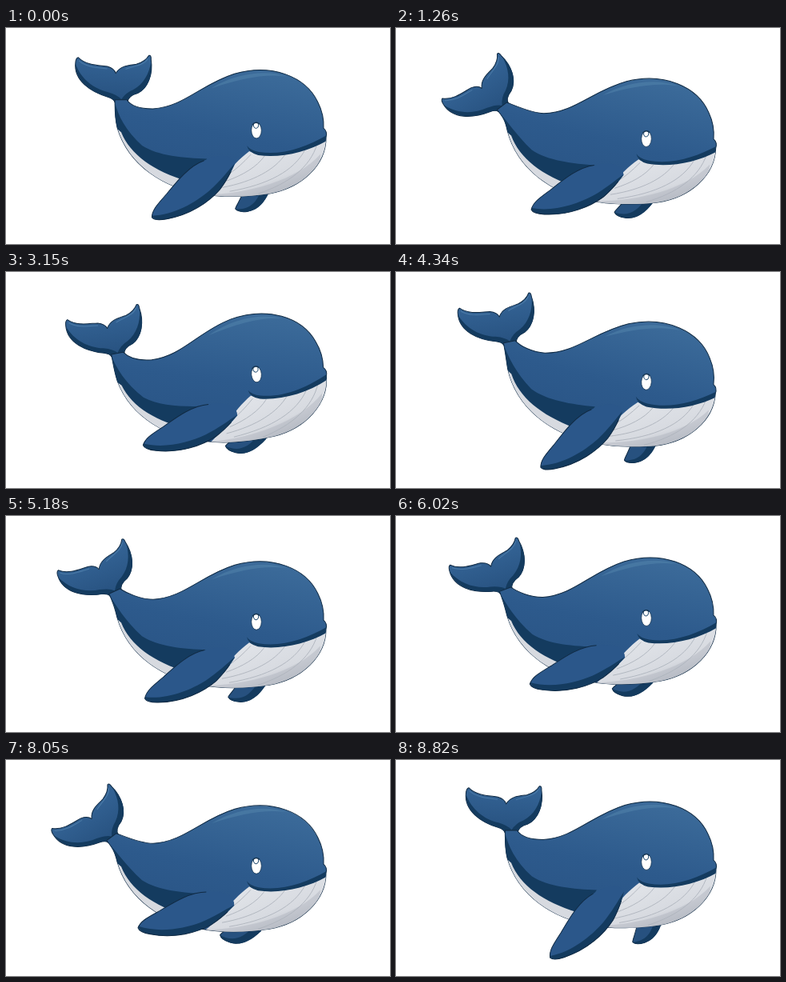
An HTML page for the animation above (8890 ms loop, 480 by 270 pixels).

```html
<!DOCTYPE html>
<html lang="en">
<head>
<meta charset="utf-8">
<title>Swimming whale</title>
<style>
  html, body { margin: 0; width: 100%; height: 100%; overflow: hidden; background: #fff; }
  svg { display: block; width: 100vw; height: 100vh; }
  .edge { stroke: #102a43; stroke-width: 1; stroke-linejoin: round; }
  .navy { fill: #143b5f; }
  .groove { fill: none; stroke: #aeb4bd; stroke-width: .9; }
</style>
</head>
<body>
<svg viewBox="0 0 480 270">
  <defs>
    <linearGradient id="skin" gradientUnits="userSpaceOnUse" x1="290" y1="50" x2="255" y2="215">
      <stop offset="0" stop-color="#3b6a99"/>
      <stop offset=".5" stop-color="#2d5a8c"/>
      <stop offset="1" stop-color="#295384"/>
    </linearGradient>
    <linearGradient id="fluke" x1="0" y1="0" x2="0" y2="1">
      <stop offset="0" stop-color="#356597"/>
      <stop offset="1" stop-color="#27517f"/>
    </linearGradient>
    <linearGradient id="throat" gradientUnits="userSpaceOnUse" x1="325" y1="150" x2="345" y2="208">
      <stop offset="0" stop-color="#e0e3e8"/>
      <stop offset=".65" stop-color="#d7dae0"/>
      <stop offset="1" stop-color="#b7bcc4"/>
    </linearGradient>
    <clipPath id="bodyClip"><path id="clipShape"/></clipPath>
  </defs>
  <g id="whale">
    <g id="farFin">
      <path class="edge" fill="#27517f" d="M336 178C333 208 323 225 309 229Q298 232 294 228C294 222 303 212 303 180Z"/>
      <path class="navy" d="M334 195C329 218 320 226 309 229Q299 232 294 228C310 227 320 218 323 195Z"/>
    </g>
    <g id="tail">
      <path class="edge" fill="url(#fluke)" d="M135 92Q134 88 126 86C104 81 82 68 83 46Q83 40 86 39C97 49 114 47 123 48Q132 50 134 56C139 46 149 45 159 43Q170 39 174 31Q177 30 177 36C181 54 175 72 163 79Q151 83 151 91Z"/>
      <path class="navy" d="M135 91Q132 87 126 86C104 81 84 68 83 47C91 66 108 77 126 80Q139 83 143 88Q148 79 157 75C170 67 176 53 177 39C181 56 175 73 163 79Q151 83 150 91Z"/>
      <path fill="none" stroke="#4a7aa7" d="M87 43C99 52 116 50 123 51M146 50C156 45 169 44 173 35"/>
    </g>
    <path id="body" class="edge" fill="url(#skin)"/>
    <g clip-path="url(#bodyClip)">
      <path id="shade" class="navy"/>
      <path fill="#d7dae0" d="M144 129C155 157 184 178 227 191L228 210C185 200 150 170 138 124Z"/>
      <path fill="url(#throat)" d="M304 154C326 164 367 160 403 139L404 160C391 205 325 220 244 212C265 199 277 174 304 154Z"/>
      <path fill="#b3b8c1" opacity=".5" d="M248 208C302 207 363 191 393 158L390 190L330 214L244 216Z"/>
      <path class="groove" d="M323 160C313 174 295 184 275 191M349 158C336 177 309 192 270 199M374 152C360 179 327 196 279 204M389 145C380 175 352 195 315 207M306 158Q291 174 280 181"/>
      <path class="navy" d="M301 147Q305 153 316 155C345 160 376 149 402 134L402 141C376 156 343 163 315 159Q303 156 301 147Z"/>
      <path fill="#5585ae" opacity=".5" d="M257 75C288 56 326 52 351 61C324 57 294 63 257 75Z"/>
    </g>
    <g>
      <ellipse cx="313" cy="128" rx="6.3" ry="10" fill="#fff" stroke="#173653" stroke-width=".8"/>
      <path d="M309.5 119V123Q312.5 128 315.5 123V119" fill="#fff" stroke="#315779"/>
      <path d="M308 121Q312 116 317 120" fill="none" stroke="#173653" stroke-width="1.4"/>
    </g>
    <g id="nearFin">
      <path fill="#2b578a" d="M248 164C228 169 211 187 197 201C184 213 177 219 176 228Q179 233 193 232C224 230 249 216 264 202C274 191 280 182 286 172Q282 153 248 164Z"/>
      <path class="navy" d="M176 226C204 228 232 215 251 202C266 191 275 181 286 171C280 182 274 191 264 202C249 216 224 230 193 232Q178 233 176 226Z"/>
      <path fill="none" class="edge" d="M248 164C228 169 211 187 197 201C184 213 177 219 176 228Q179 233 193 232C224 230 249 216 264 202Q274 191 280 181"/>
    </g>
  </g>
</svg>
<script>
const LOOP = 8890, STEP = 70;
const TAIL_BEATS = [1150, 3810, 5570, 7870];
const FIN_BEATS = [-400, 1840, 4640, 6790, 9040];
const BEAT_REACH = 900;
const $ = id => document.getElementById(id);

// Rises smoothly from 0 to 1 at each beat and falls back again.
function pulse(beats, time) {
  return beats.reduce((sum, beat) => {
    const x = Math.min(Math.abs(time - beat) / BEAT_REACH, 1);
    return sum + Math.cos(x * Math.PI / 2) ** 2;
  }, 0);
}

function turnPoint(x, y, degrees, cx, cy) {
  const a = degrees * Math.PI / 180, c = Math.cos(a), s = Math.sin(a);
  return [cx + (x - cx) * c - (y - cy) * s, cy + (x - cx) * s + (y - cy) * c]
    .map(n => n.toFixed(2)).join(' ');
}

const rotate = (id, degrees, x, y) =>
  $(id).setAttribute('transform', `rotate(${degrees} ${x} ${y})`);

function draw(time) {
  const seconds = time / 1000;
  const wave = -Math.cos(6 * Math.PI * time / LOOP);
  const bob = (6.2 - .27 * seconds) * (1 + wave) - .6 * Math.min(seconds, 1);
  const tilt = 4.8 * wave * Math.exp(-(((seconds - 3.3) / 2.1) ** 2));
  const bend = 4 - 41 * pulse(TAIL_BEATS, time);
  const stroke = pulse(FIN_BEATS, time);
  const stalk = (x, y) => turnPoint(x, y, bend, 143, 108);

  $('whale').setAttribute('transform', `translate(0 ${bob}) rotate(${tilt} 313 128)`);
  rotate('tail', bend, 143, 108);
  rotate('nearFin', 14 - 33 * stroke, 262, 172);
  rotate('farFin', 34 - 42 * stroke, 303, 178);

  // The stalk end of the body follows the tail.
  const outline = `M${stalk(135, 89)}L${stalk(150, 88)}C${stalk(156, 96)} 168 100 184 100`
    + 'C222 98 244 70 286 57C333 44 375 61 390 93Q398 109 397 126'
    + 'Q402 130 400 137C400 171 370 200 329 207C303 211 270 212 245 207'
    + `C197 199 153 171 139 123C136 110 ${stalk(136, 101)} ${stalk(135, 89)}Z`;
  $('body').setAttribute('d', outline);
  $('clipShape').setAttribute('d', outline);
  $('shade').setAttribute('d', `M${stalk(134, 87)}C${stalk(138, 105)} 148 126 170 146`
    + `C190 159 222 162 251 163L228 194C182 183 150 160 138 125L${stalk(134, 99)}Z`);
}

function frame() {
  const time = performance.now() % LOOP;
  draw(Math.floor(time / STEP) * STEP);
  requestAnimationFrame(frame);
}
frame();
</script>
</body>
</html>
```
